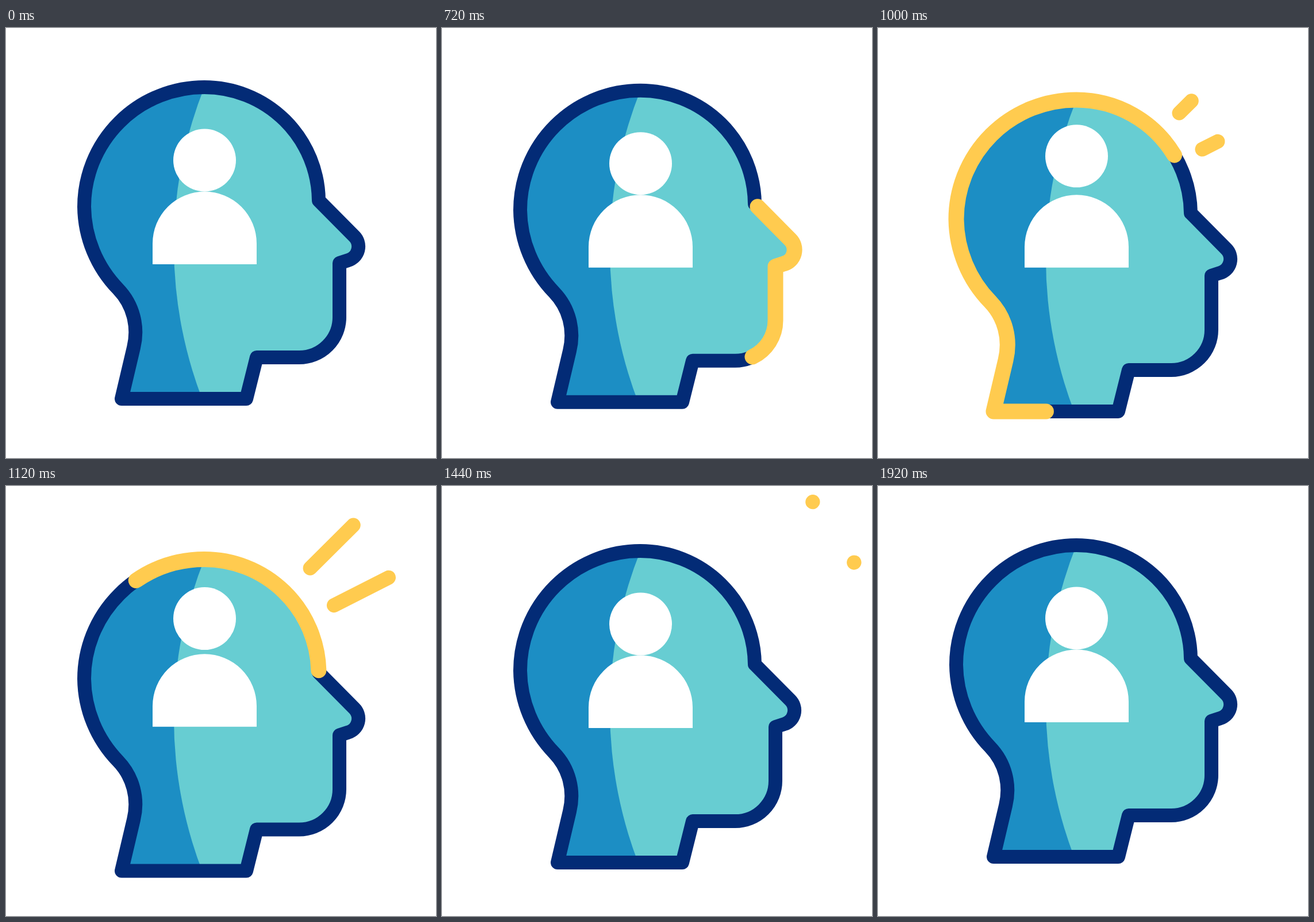
Recreate the animation shown at these times as an HTML page. Size 748 by 748 pixels, loop 2.2 s.

```html
<!DOCTYPE html>
<html lang="en">
<head>
<meta charset="utf-8">
<title>Head with person</title>
<style>
html, body { margin: 0; width: 100%; height: 100%; overflow: hidden; background: #fff; }
svg { display: block; width: 100%; height: 100%; }
path, line { fill: none; stroke-linecap: round; stroke-linejoin: round; }
.outline { stroke: #032b76; stroke-width: 24; }
.sweep { stroke: #ffcb4f; stroke-width: 27; }
.ray { stroke: #ffcb4f; stroke-width: 25; }
.person > * { fill: #fff; }
</style>
</head>
<body>
<svg viewBox="0 0 748 748">
  <defs>
    <path id="shape" pathLength="1" d="M544 300L605.7 362.3A25 25 0 0 1 595.3 404L580 409V503A70 70 0 0 1 510 573H436L418 645H201L222 556C231 519 221 481 195 454A209 209 0 0 1 136 311A209 208 0 0 1 345 103A199 199 0 0 1 544 300"/>
    <clipPath id="inside"><use href="#shape"/></clipPath>
  </defs>
  <g id="head">
    <g clip-path="url(#inside)">
      <rect x="120" y="90" width="520" height="570" fill="#1c8ec4"/>
      <circle cx="1037" cy="379" r="745" fill="#67cdd2"/>
    </g>
    <use href="#shape" class="outline"/>
    <use href="#shape" class="sweep" id="sweep"/>
  </g>
  <g class="person">
    <circle id="face" cx="345.5" cy="230" r="54.5"/>
    <path id="body" d="M255 411V375A90.5 90.5 0 0 1 436 375V411Z"/>
  </g>
  <line class="ray" data-line="524 148 645 27.5"/>
  <line class="ray" data-line="564 211 717 133"/>
</svg>
<script>
const LOOP = 2200;
const $ = id => document.getElementById(id);
const rays = [...document.querySelectorAll('.ray')].map(el => ({
  el, line: el.dataset.line.split(' ').map(Number)
}));

// Cubic in-out progress between two times
function ease(t, from, to) {
  const u = Math.min(1, Math.max(0, (t - from) / (to - from)));
  return u < 0.5 ? 4 * u ** 3 : 1 - 4 * (1 - u) ** 3;
}

// Smooth rise and fall around a centre time
function bump(t, centre, half, power) {
  const d = Math.abs(t - centre) / half;
  return d < 1 ? Math.cos(d * Math.PI / 2) ** power : 0;
}

function shift(el, y) {
  el.setAttribute('transform', `translate(0 ${y.toFixed(2)})`);
}

function show(el, on) {
  el.style.display = on ? '' : 'none';
}

function draw(t) {
  const sink = 24.5 * bump(t, 1120, 740, 3.5);
  const lift = 17.5 * bump(t, 1070, 370, 2);
  const hop = 13 * bump(t, 1000, 260, 2);
  shift($('head'), sink);
  shift($('body'), sink - lift);
  shift($('face'), sink - lift - hop);

  const tail = ease(t, 640, 1440);
  const tip = ease(t, 460, 1180);
  $('sweep').style.strokeDasharray = `${tip - tail} 2`;
  $('sweep').style.strokeDashoffset = -tail;
  show($('sweep'), tip - tail > 1e-5);

  const near = ease(t, 1020, 1480);
  const far = ease(t, 798, 1373);
  for (const { el, line: [x1, y1, x2, y2] } of rays) {
    const set = (name, a, b, k) => el.setAttribute(name, a + (b - a) * k);
    set('x1', x1, x2, near);
    set('y1', y1, y2, near);
    set('x2', x1, x2, far);
    set('y2', y1, y2, far);
    show(el, far - near > 1e-3);
  }
}

function frame() {
  draw(performance.now() % LOOP);
  requestAnimationFrame(frame);
}
frame();
</script>
</body>
</html>
```
